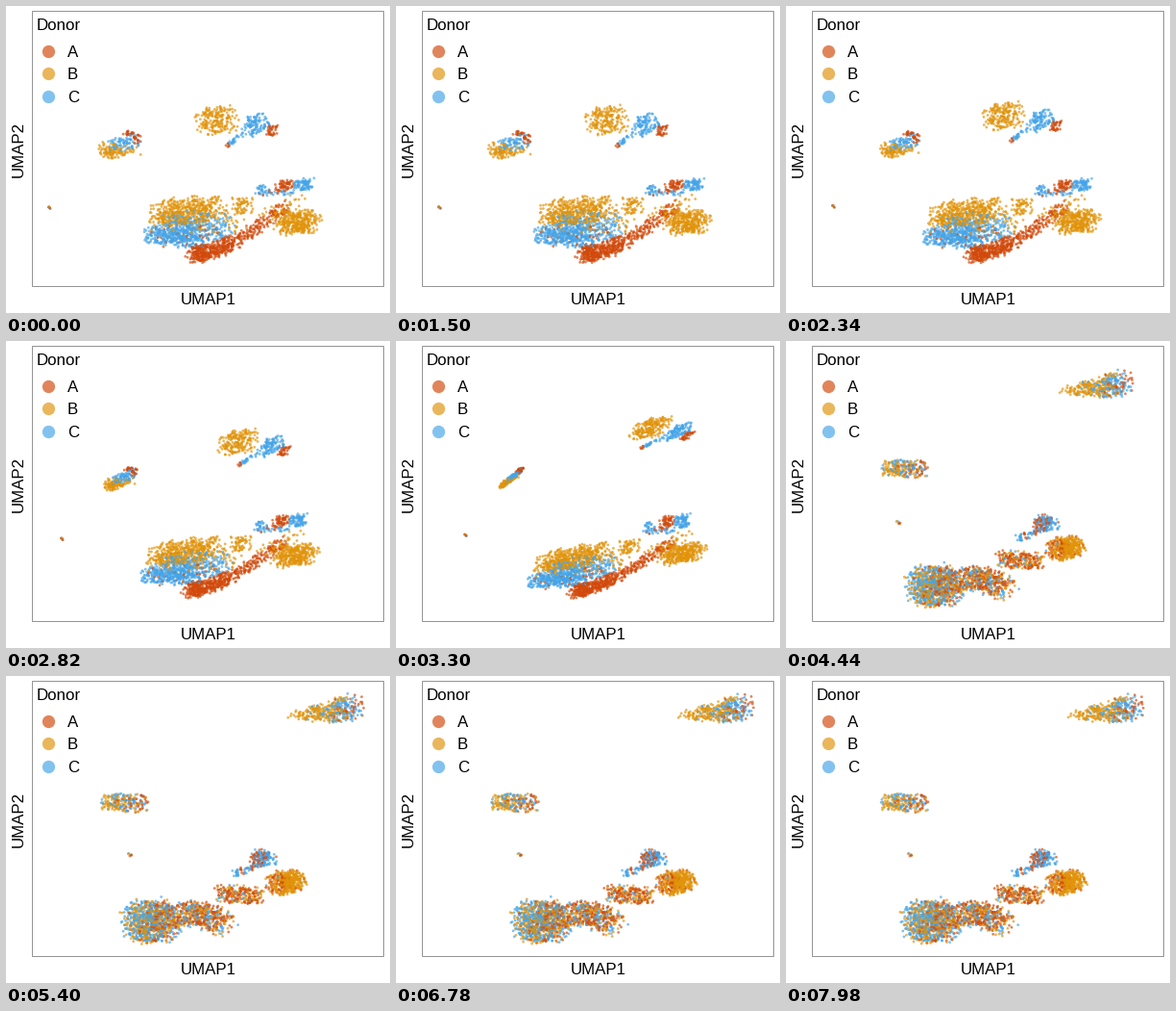
These frames come from a looping animation (400x319 px, 8 s). A matplotlib script:

```python
import numpy as np
import matplotlib.pyplot as plt
from matplotlib.animation import FuncAnimation
from matplotlib.patches import Rectangle

W, H, DPI = 400, 319, 100
LOOP, STEP = 8000, 40
T0, T1, T2, T3 = 1700, 3300, 4440, 5400   # start, warped, mixed, settled

COLORS = {"A": "#d1490b", "B": "#e1930a", "C": "#45a4e8"}
ALPHA = 0.67

plt.rcParams["font.family"] = "Liberation Sans"
rng = np.random.default_rng(7)

# Positions are complex numbers: x + y*1j in pixels, y pointing down.


def spray(n, radius, *path):
    """Random points along a path; a pair of radii makes it taper."""
    r0, r1 = radius if isinstance(radius, tuple) else (radius, radius)
    s = rng.random(n) ** np.sqrt(r0 / r1)
    spine = np.interp(s, np.linspace(0, 1, len(path)), path)
    disc = np.sqrt(rng.random(n)) * np.exp(2j * np.pi * rng.random(n))
    fuzz = rng.normal(0, 0.1, n) + 1j * rng.normal(0, 0.1, n)
    return spine + (r0 + (r1 - r0) * s) * (disc + fuzz)


def cluster(strokes, shift, ex, ey, ends, lead, blur):
    """Four poses and the donors of one cluster.

    strokes: (donor, count, radius, path) at the start
    shift, ex, ey: affine warp of the start about its centre
    ends: (share, radius, path) after mixing
    lead: offset from the settled pose just after mixing
    blur: how far donors mix along x, in pixels
    """
    start = np.concatenate([spray(n, r, *path) for _, n, r, *path in strokes])
    donors = [d for d, n, *_ in strokes for _ in range(n)]
    n = len(start)

    centre = start.mean()
    z = start - centre
    warped = centre + shift + z.real * ex + z.imag * ey

    cuts = np.round(np.cumsum([0] + [e[0] for e in ends]) * n).astype(int)
    final = np.concatenate([spray(k, r, *path) for k, (_, r, *path)
                            in zip(np.diff(cuts), ends)])
    # Neighbours along x stay neighbours, give or take the blur.
    rank = np.argsort(start.real + rng.normal(0, blur, n))
    settled = np.empty(n, complex)
    settled[rank] = final[np.argsort(final.real)]

    middle = settled.mean()
    mixed = middle + lead + 0.97 * (settled - middle)
    return start, warped, mixed, settled, donors


top = cluster(
    [("B", 200, 15, 209 + 120j, 231 + 118j),
     ("C", 115, 10, 255 + 126j, 267 + 121j),
     ("C", 25, 3, 231 + 143j, 250 + 133j),
     ("A", 34, 6.5, 275 + 128j, 279 + 128j),
     ("A", 6, 2.5, 231 + 145j)],
    40 - 30j, 0.78, -0.71 + 0.77j,
    [(1, (3, 15), 291 + 43j, 360 + 34j)],
    -10 + 11j, 30)

left = cluster(
    [("B", 100, 8, 100 + 150j, 120 + 151j),
     ("B", 15, 6, 125 + 151j, 138 + 150j),
     ("C", 75, 8, 110 + 145j, 134 + 141j),
     ("A", 38, 4.5, 125 + 132j, 139 + 140j)],
    1 - 3j, 0.45 - 0.25j, -0.3 + 0.5j,
    [(1, 9.5, 105 + 132j, 143 + 132j)],
    1j, 15)

speck = cluster(
    [(donor, 2, 1, 44 + 209j, 46 + 210j) for donor in "ABC"],
    28 - 8j, 1, 1j,
    [(1, 1, 127 + 185j, 132 + 187j)],
    -12 + 3j, 2)

core = cluster(
    [("B", 450, 14, 158 + 216j, 218 + 211j),
     ("B", 60, 9, 240 + 206j, 254 + 208j),
     ("B", 110, 14, 160 + 226j, 245 + 222j),
     ("B", 350, 12, 286 + 224j, 319 + 224j),
     ("B", 40, 8, 268 + 218j, 308 + 201j),
     ("C", 300, 10, 150 + 238j, 195 + 241j),
     ("C", 220, 15, 170 + 228j, 222 + 228j),
     ("C", 60, 8, 192 + 248j, 235 + 230j),
     ("A", 410, 9, 196 + 258j, 210 + 256j, 240 + 244j),
     ("A", 150, 7, 240 + 244j, 268 + 226j, 291 + 207j),
     ("A", 40, 12, 160 + 238j, 220 + 238j)],
    -6 + 5j, 1 - 0.12j, -0.1 + 0.8j,
    [(0.46, 21, 137 + 255j, 166 + 255j),
     (0.22, 14, 182 + 246j, 204 + 248j, 228 + 256j),
     (0.11, 9, 222 + 226j, 264 + 229j),
     (0.21, 12, 280 + 216j, 303 + 213j)],
    2, 22)

crown = cluster(
    [("C", 85, 6.5, 305 + 187j, 316 + 185j),
     ("A", 52, 5.5, 285 + 187j, 296 + 185j),
     ("C", 30, 5, 263 + 191j, 272 + 192j),
     ("C", 22, 5, 272 + 193j, 305 + 193j),
     ("A", 14, 5, 265 + 194j, 295 + 193j)],
    -9 + 2j, 0.8, 1.2j,
    [(0.8, 9, 260 + 190j, 275 + 190j),
     (0.2, 4.5, 237 + 205j, 256 + 199j)],
    3, 15)

*poses, donors = [np.concatenate(p)
                  for p in zip(top, left, speck, core, crown)]
order = rng.permutation(len(donors))
P0, P1, P2, P3 = [p[order] for p in poses]
point_colors = [COLORS[d] for d in donors[order]]

V1 = 2 * (P1 - P0) / (T1 - T0)
V2 = 2 * (P3 - P2) / (T3 - T2)
phase = 2 * np.pi * rng.random(len(P0))
turns = rng.choice([-4, -3, -2, 2, 3, 4], len(P0))


def positions(t):
    """Ease in to the warp, glide through the mixing, ease out."""
    if t < T1:
        s = max(0, (t - T0) / (T1 - T0))
        z = P0 + (P1 - P0) * s ** 2
    elif t < T2:
        span = T2 - T1
        s = (t - T1) / span
        z = (P1 + (P2 - P1) * s * s * (3 - 2 * s)
             + V1 * span * s * (1 - s) ** 2
             - V2 * span * s * s * (1 - s))
    else:
        s = min(1, (t - T2) / (T3 - T2))
        z = P2 + (P3 - P2) * (1 - (1 - s) ** 2)
    z = z + 0.25 * np.exp(1j * (phase + turns * 2 * np.pi * t / LOOP))
    return np.c_[z.real, z.imag]


fig = plt.figure(figsize=(W / DPI, H / DPI), dpi=DPI, facecolor="white")
ax = fig.add_axes([0, 0, 1, 1])
ax.set(xlim=(0, W), ylim=(H, 0))
ax.axis("off")


def label(x, y, text, **kw):
    ax.text(x, y, text, fontsize=12.2, color="black", va="baseline", **kw)


def dots(xy, size, colors, **kw):
    """Scatter dots with a diameter in pixels."""
    x, y = np.transpose(xy)
    return ax.scatter(x, y, s=(size * 72 / DPI) ** 2, c=colors,
                      alpha=ALPHA, linewidths=0, **kw)


points = dots(positions(0), 2.8, point_colors, zorder=2)
ax.add_patch(Rectangle((27.5, 5.5), 366, 286, fill=False, ec="#949494",
                       lw=0.72, zorder=3, snap=False))
label(32, 25, "Donor")
for i, (name, color) in enumerate(COLORS.items()):
    y = 46.7 + 23.7 * i
    dots([(44.3, y)], 13.3, [color], zorder=3)
    label(64, y + 6, name)
label(210.5, 310, "UMAP1", ha="center")
label(18, 149, "UMAP2", ha="center", rotation=90, rotation_mode="anchor")


def update(i):
    points.set_offsets(positions(i * STEP))
    return (points,)


anim = FuncAnimation(fig, update, frames=LOOP // STEP, interval=STEP,
                     repeat=True, repeat_delay=0)
plt.show()
```
